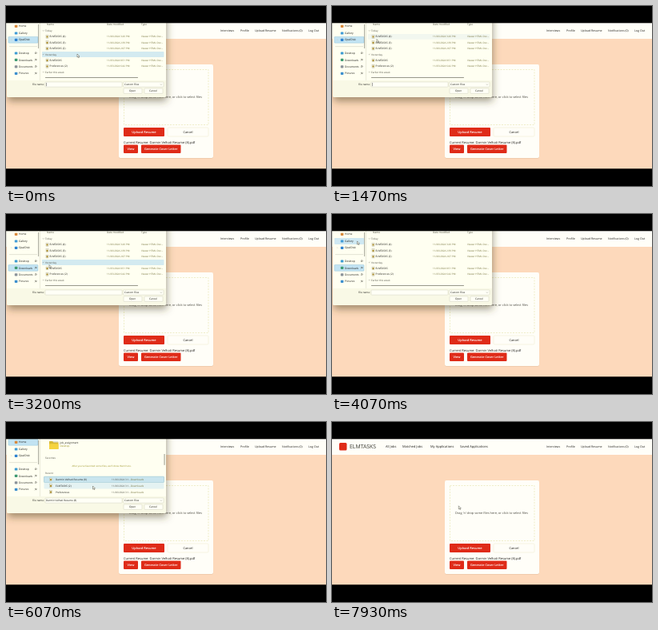
These frames come from a looping animation (400 px wide and 225 px high, 8000 ms). An HTML page:

```html
<!DOCTYPE html>
<html lang="en">
<head>
<meta charset="utf-8">
<title>Resume upload</title>
<style>
  html, body { margin: 0; width: 100%; height: 100%; overflow: hidden; background: #000; }
  svg { display: block; width: 100vw; height: 100vh; }
  text { font-family: "Open Sans", "Noto Sans", sans-serif; font-weight: 500; text-rendering: geometricPrecision; white-space: pre; }
</style>
</head>
<body>
<svg id="stage" viewBox="0 0 400 225"></svg>
<script>
const LOOP = 8000;
const INK = '#1d1d1a', SOFT = '#55554b', MUTED = '#77743f', OLIVE = '#989020';
const RED = '#df2b18', PAPER = '#fffef8';
const SITE = 'ELMTASKS', RESUME = 'Darmin Velhati Resume (8)';
const ROW = 7.4, LIST_TOP = 27.2, SCROLL = 76.3;

// y is the vertical middle of the text
const text = (x, y, s, size = 3.2, fill = INK, extra = '') =>
  `<text x="${x}" y="${y + size * 0.36}" font-size="${size}" fill="${fill}" ${extra}>${s}</text>`;
const mid = 'text-anchor="middle"';
const rect = (x, y, w, h, fill, extra = '') =>
  `<rect x="${x}" y="${y}" width="${w}" height="${h}" fill="${fill}" ${extra}/>`;
const group = (id, body) => `<g id="${id}">${body}</g>`;
const button = (x, y, w, h, label, size) =>
  rect(x, y, w, h, RED, 'rx="1"') +
  text(x + w / 2, y + h / 2, label, size, '#fff', mid + ' style="font-weight:600"');
const folder = (x, y, color, glyph) =>
  `<path d="M${x} ${y + 0.6}h4l1.5 1.5h6v8.4h-11.5z" fill="${color}"/>` +
  rect(x, y + 0.6, 11.5, 9.9, '#000', 'rx=".8" opacity=".12"') +
  rect(x, y + 3.8, 11.5, 6.7, color, 'rx=".8"') +
  (glyph ? rect(x + 4.2, y + 5.4, 3.2, 2.8, '#fff', 'rx=".6" opacity=".75"') : '');
const pin = (x, y) =>
  `<path d="M${x - 1} ${y + 1}l1-1m-.6-.8l1.4 1.4l.5-1.1l-.8-.8z" stroke="#3c3c35" stroke-width=".5" fill="none"/>`;
const fileIcon = (x, y) =>
  rect(x, y - 1.9, 3, 3.8, '#f2efdc', 'stroke="#99987f" stroke-width=".3"') +
  `<circle cx="${x + 1.5}" cy="${y + 0.2}" r="1.1" fill="#a5861f"/>`;

function page() {
  const links = [
    [67, 'All Jobs', 4], [88, 'Matched Jobs', 4], [123, 'My Applications', 4], [160, 'Saved Applications', 4],
    [268, 'Interviews', 3.6], [293, 'Profile', 3.6], [311, 'Upload Resume', 3.6],
    [345, 'Notifications (0)', 3.5], [378, 'Log Out', 3.6]
  ];
  return rect(0, 21, 400, 183, '#fdd9bb') + rect(0, 21, 400, 20, PAPER) +
    rect(9, 26, 9.5, 9.5, RED, 'rx="1.5"') +
    text(22, 31, SITE, 6.9, '#3b3b34') +
    links.map(([x, label, size]) => text(x, 31, label, size)).join('') +
    rect(141, 73.5, 118, 117, '#8a5a30', 'rx="2" opacity=".22"') +
    rect(141, 73, 118, 117, PAPER, 'rx="2"') +
    rect(147.5, 79.5, 105.5, 69, 'none', 'stroke="#e4e2a8" stroke-width=".6" stroke-dasharray="2 1.5"') +
    text(154, 114, "Drag 'n' drop some files here, or click to select files", 3.9, '#4a4a42') +
    button(147, 152, 51, 11, 'Upload Resume', 4) +
    rect(202, 152, 51, 11, PAPER, 'rx="1" stroke="#eceacb" stroke-width=".5"') +
    text(227.5, 157.5, 'Cancel', 3.9, INK, mid) +
    text(147, 170.3, `Current Resume: ${RESUME}.pdf`, 4) +
    button(147, 173.5, 18, 10.5, 'View', 3.9) +
    button(169, 173.5, 49.5, 10.5, 'Generate Cover Letter', 3.9);
}

const SIDE = [
  ['Home', 25.3, '#d98a3c'], ['Gallery', 34, '#3f9bd6'], ['OpalDisk', 42.3, '#2f83d0'],
  ['Desktop', 59, '#3c9bd2'], ['Downloads', 67.4, '#3f9a72'], ['Documents', 75.8, '#8a9299'], ['Pictures', 84.3, '#3d8fce']
];

function sidebar() {
  return SIDE.map(([label, y, color], i) =>
    rect(10.8, y - 1.6, 3.6, 3.2, color, 'rx=".7"') + text(16, y, label, 3.3) +
    (i > 2 ? pin(37, y) : '')).join('') +
    `<path d="M6 41.3l1 1l-1 1M4 50.6h35" fill="none" stroke="#c9c9b6" stroke-width=".5"/>` +
    rect(42, 21, 0.5, 72, '#d5d5c2') + rect(40.3, 23, 0.8, 30, '#8f8f82');
}

function fileList() {
  const rows = [
    'Today', [4, '11/26/2024 3:26 PM'], [3, '11/26/2024 2:39 PM'], [2, '11/26/2024 2:07 PM'],
    'Yesterday', [0, '11/25/2024 8:51 PM'], ['Preferences (2)', '11/25/2024 6:42 PM'], 'Earlier this week'
  ];
  const head = [[51, 'Name'], [126, 'Date modified'], [169, 'Type']];
  return head.map(([x, s]) => text(x, 22.7, s, 3.2, SOFT)).join('') +
    rows.map((row, i) => {
      const y = LIST_TOP + ROW * (i + 0.5);
      if (typeof row === 'string')
        return `<path d="M45.8 ${y - 0.5}l.9 .9l.9-.9" fill="none" stroke="#66665c" stroke-width=".4"/>` +
          text(49, y, row, 3.1, SOFT);
      const [name, date] = row;
      const label = typeof name === 'string' ? name : SITE + (name ? ` (${name})` : '');
      return fileIcon(50, y) + text(54.5, y, label, 3.2) +
        text(126, y, date, 3.05, MUTED) + text(169, y, 'Viewer HTML Doc...', 3.05, MUTED);
    }).join('') +
    rect(49, 88.9, 116, 0.9, '#77776b', 'rx=".4"');
}

function homeView() {
  const items = [
    ['Desktop', '#1c9fb0'], ['Downloads', '#27a55f'], ['Documents', '#8b9fa8'], ['Pictures', '#2590d6'],
    ['Music', '#dc5f33'], ['Videos', '#8b46b8'], ['Archival', '#d3a92c'], ['Captures', '#f5d33f']
  ];
  const quick = items.map(([label, color], i) => {
    const x = i % 2 ? 113.5 : 54, y = 33 + 17.3 * (i >> 1), pinned = i < 6;
    return folder(x, y - 2.8, color, pinned) + text(x + 13.5, y, label, 3.2) +
      text(x + 13.5, y + 4.3, pinned ? 'Stored locally' : 'Desktop', 3.1, OLIVE) +
      (pinned ? pin(x + 14.5, y + 8.3) : '');
  }).join('');
  const recent = [RESUME, SITE + ' (2)', 'Preferences'].map((name, i) => {
    const y = 71.9 + 7.8 * i;
    return rect(47.5, y - 3.7, 150, 7.4, 'none', `id="recent${i}" rx=".7" stroke-width=".4"`) +
      fileIcon(54.5, y) + text(62, y, name, 3.15) +
      text(132, y, '11/26/2024 3:1...', 3.05, SOFT) + text(156, y, 'Downloads', 3.1, MUTED);
  }).join('');
  const lower = folder(54, 23.5, '#f5d33f') + text(67.5, 25.9, 'job_assignment', 3.15) +
    text(67.5, 30.3, 'Desktop', 3.1, OLIVE) +
    text(49, 45, 'Favorites', 3.1, SOFT) +
    text(119.5, 55, "After you've favorited some files, we'll show them here.", 2.9, OLIVE, mid) +
    text(49, 63.5, 'Recent', 3.1, SOFT) + recent;
  return group('homeScroll', text(49, 23.5, 'Quick access', 3.1, SOFT) + quick +
    `<g transform="translate(0 ${SCROLL})">${lower}</g>`) +
    rect(197.6, 0, 0.9, 14, '#8d8d80', 'id="thumb" rx=".4"');
}

function dialog() {
  const control = (x, y, w, h, id = '') =>
    rect(x, y, w, h, '#fffff6', `${id && `id="${id}"`} rx=".7" stroke="#c8c8b4" stroke-width=".4"`);
  return rect(1, 5, 199, 109, '#fffff1', 'rx="2.5" filter="url(#shadow)"') +
    `<path d="M1 93h199v18.5a2.5 2.5 0 0 1-2.5 2.5h-194a2.5 2.5 0 0 1-2.5-2.5z" fill="#f9f9e6"/>` +
    rect(3, 0, 37, 7.8, '#cfe8f2', 'id="sideHover" rx=".8"') +
    rect(3, 0, 37, 7.8, '#c2e3f2', 'id="sideSel" rx=".8" stroke="#86bcd6" stroke-width=".4"') +
    sidebar() +
    `<g clip-path="url(#pane)">` +
    group('list', rect(45, 0, 152.5, ROW - 0.6, '#dceff3', 'id="rowHover" rx=".7"') + fileList()) +
    group('home', homeView()) + '</g>' +
    text(33, 98, 'File name:', 3.1) +
    control(49, 95, 96, 6.2) + rect(49.5, 95.9, 39, 4.5, '#459fce', 'id="nameSel"') +
    group('fileName', text(50, 98, RESUME, 3.1)) +
    rect(50, 96, 0.4, 4.2, INK, 'id="caret"') +
    control(146.5, 95, 50.5, 6.2) + text(148, 98, 'Custom Files', 3.1) +
    `<path d="M193 97.6l.9 .9l.9-.9" fill="none" stroke="#66665c" stroke-width=".4"/>` +
    control(147, 103, 23, 6.4, 'openBtn') + text(158, 106.2, 'Open', 3.2, INK, mid) +
    control(173, 103, 23, 6.4) + text(184, 106.2, 'Cancel', 3.2, INK, mid);
}

document.getElementById('stage').innerHTML =
  `<defs>
    <filter id="shadow" x="-20%" y="-20%" width="140%" height="150%">
      <feDropShadow dx="1" dy="5" stdDeviation="5" flood-color="#4a4220" flood-opacity=".5"/>
    </filter>
    <clipPath id="pane"><rect x="42.5" y="21" width="157" height="72"/></clipPath>
  </defs>` +
  page() + group('dialog', dialog()) +
  group('cursor', `<path d="M0 0v4.1l1-.9l.7 1.5l.7-.3l-.7-1.4h1.3z" fill="#fffff4" stroke="#44443a" stroke-width=".45"/>`) +
  rect(0, 0, 400, 21.3, '#000') + rect(0, 203.3, 400, 22, '#000');

const $ = id => document.getElementById(id);
const set = (id, name, value) => $(id).setAttribute(name, value);
const show = (id, on) => set(id, 'visibility', on ? 'inherit' : 'hidden');
const clamp = v => Math.max(0, Math.min(1, v));
const ease = v => v * v * (3 - 2 * v);

// time, x, y of the pointer tip
const PATH = [
  [0, 89, 60], [700, 88, 59], [1470, 56, 41.5], [1900, 50, 50], [2450, 24, 67], [2700, 24, 67],
  [3200, 54, 63.5], [3700, 60, 58], [4250, 22, 26], [4500, 22, 26], [4870, 23.5, 34], [5250, 100, 60],
  [5750, 109, 72], [6070, 108.5, 80], [6350, 112, 83], [6750, 157, 104.5], [LOOP, 158.3, 104.8]
];

function pointer(t) {
  const i = Math.max(1, PATH.findIndex(p => p[0] > t));
  const [t0, x0, y0] = PATH[i - 1], [t1, x1, y1] = PATH[i];
  const k = ease((t - t0) / (t1 - t0));
  return [x0 + (x1 - x0) * k, y0 + (y1 - y0) * k];
}

function render(t) {
  const [x, y] = pointer(t);
  set('cursor', 'transform', `translate(${x} ${y})`);

  const atHome = t >= 4400, picked = t >= 5850, opening = t >= 6720;
  show('list', !atHome);
  show('home', atHome);

  const selected = atHome ? 0 : t >= 2550 ? 4 : 2;
  set('sideSel', 'y', SIDE[selected][1] - 3.9);
  set('sideSel', 'fill', opening ? '#dcdccf' : '#c2e3f2');
  set('sideSel', 'stroke', opening ? 'none' : '#86bcd6');
  const hovered = x < 40 ? SIDE.find(s => Math.abs(s[1] - y) < 4.1) : null;
  show('sideHover', hovered);
  if (hovered) set('sideHover', 'y', hovered[1] - 3.9);

  const row = Math.floor((y - LIST_TOP) / ROW);
  show('rowHover', !atHome && x > 45 && row >= 0 && row < 8);
  set('rowHover', 'y', LIST_TOP + ROW * row + 0.3);
  set('rowHover', 'fill', row % 4 ? '#f2f7ef' : '#d3eaf0');

  const scroll = ease(clamp((t - 5200) / 380));
  set('homeScroll', 'transform', `translate(0 ${-SCROLL * scroll})`);
  set('thumb', 'y', 24 + 16 * scroll);
  for (let i = 0; i < 3; i++) {
    const over = scroll === 1 && x > 47 && Math.abs(y - 71.9 - 7.8 * i) < 3.9;
    const on = i === 0 && picked;
    set('recent' + i, 'fill', on ? (opening ? '#d9d9cb' : '#c9e5ee') : over ? '#e4f2f2' : 'none');
    set('recent' + i, 'stroke', on && !opening ? '#70adc4' : 'none');
  }

  show('fileName', picked);
  show('nameSel', opening);
  show('caret', !picked && t < 2550);
  const overOpen = y > 103 && x > 147;
  set('openBtn', 'fill', overOpen ? '#d5eaf3' : '#fffff6');
  set('openBtn', 'stroke', overOpen ? '#4a9cc4' : '#c8c8b4');

  const closing = clamp((t - 6915) / 140);
  show('dialog', closing < 1);
  set('dialog', 'opacity', 1 - closing);
  const scale = 1 - 0.06 * closing;
  set('dialog', 'transform', `translate(100 60) scale(${scale}) translate(-100 -60)`);
}

const start = performance.now();
function frame() {
  render((performance.now() - start) % LOOP);
  requestAnimationFrame(frame);
}
render(0);
requestAnimationFrame(frame);
</script>
</body>
</html>
```
